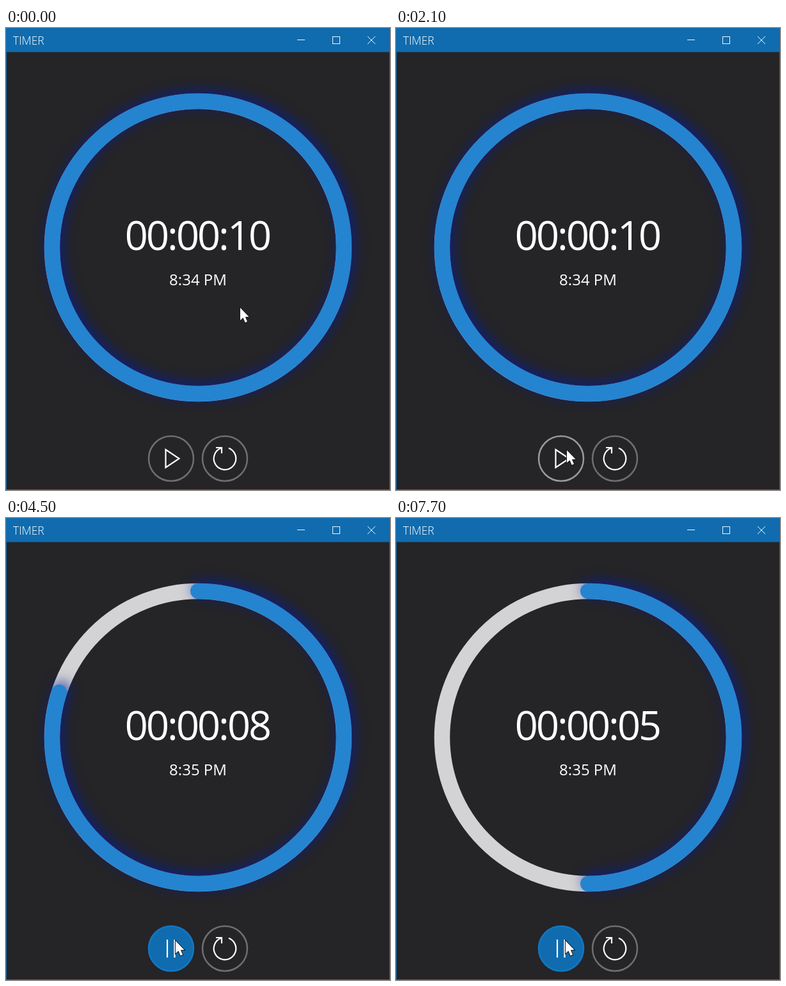
Write an HTML page with a canvas that moves like this. It is 600 px wide and 720 px high and loops after 8000 ms.

```html
<!DOCTYPE html>
<html lang="en">
<head>
<meta charset="utf-8">
<title>Timer</title>
<style>
  html, body { margin: 0; width: 100%; height: 100%; overflow: hidden; background: #252427; }
  canvas { display: block; }
</style>
</head>
<body>
<canvas id="stage" width="600" height="720"></canvas>
<script>
const ctx = document.getElementById('stage').getContext('2d');
const LOOP = 8000;
const START = 2200;
const TICKS = [3200, 4200, 5200, 6200, 7100];
const BLUE = '#106cae';
const FONT = '"Open Sans", "Noto Sans", sans-serif';
const RING = { x: 300, y: 342, r: 228, width: 24.5 };
const PLAY = { x: 258, y: 671 };
const RESET = { x: 342, y: 671 };

// Pointer stops: time, x, y
const POINTER = [[0, 366, 436], [700, 259, 650], [1000, 259, 650],
                 [1800, 267, 658], [2200, 267, 658], [2400, 265, 659]];

function pointerAt(t) {
  const next = POINTER.findIndex(stop => stop[0] > t);
  if (next < 0) return POINTER[POINTER.length - 1].slice(1);
  const [t0, x0, y0] = POINTER[next - 1];
  const [t1, x1, y1] = POINTER[next];
  const p = (t - t0) / (t1 - t0);
  const e = p * p * (3 - 2 * p);
  return [x0 + (x1 - x0) * e, y0 + (y1 - y0) * e];
}

function stroke(color, width) {
  ctx.strokeStyle = color;
  ctx.lineWidth = width;
  ctx.stroke();
}

function path(points, close) {
  ctx.beginPath();
  points.forEach(([x, y]) => ctx.lineTo(x, y));
  if (close) ctx.closePath();
}

function circle(x, y, r) {
  ctx.beginPath();
  ctx.arc(x, y, r, 0, Math.PI * 2);
}

function text(str, x, y, font, align, spacing = 0) {
  ctx.font = `${font} ${FONT}`;
  ctx.textAlign = align;
  ctx.letterSpacing = spacing + 'px';
  ctx.fillStyle = '#fff';
  ctx.fillText(str, x, y);
}

function drawWindow() {
  ctx.fillStyle = '#252427';
  ctx.fillRect(0, 0, 600, 720);
  ctx.strokeStyle = BLUE;
  ctx.lineWidth = 1;
  ctx.strokeRect(0.5, 0.5, 599, 719);
  ctx.fillStyle = BLUE;
  ctx.fillRect(0, 0, 600, 37.5);
  text('TIMER', 11, 26, '300 17.5px', 'left');

  const white = '#eef4f9';
  path([[455, 18.5], [467, 18.5]]);
  stroke(white, 1);
  ctx.strokeRect(510.5, 13.5, 11, 11);
  path([[565, 13], [577, 25]]);
  stroke(white, 1);
  path([[577, 13], [565, 25]]);
  stroke(white, 1);
}

function drawRing(fraction) {
  const { x, y, r, width } = RING;
  circle(x, y, r);
  stroke('#d3d2d4', width);

  ctx.save();
  ctx.shadowColor = 'rgba(8, 32, 140, 0.85)';
  ctx.shadowBlur = 20;
  ctx.shadowOffsetX = 4;
  ctx.shadowOffsetY = -4;
  ctx.lineCap = 'round';
  ctx.beginPath();
  ctx.arc(x, y, r, -Math.PI / 2, (fraction * 2 - 0.5) * Math.PI);
  stroke('#2484d0', width - 0.5);
  ctx.restore();
}

function drawPlayButton(running, hover) {
  const { x, y } = PLAY;
  circle(x, y, 35);
  if (running) {
    ctx.fillStyle = BLUE;
    ctx.fill();
  }
  stroke(running ? '#1177c4' : hover ? '#9a999b' : '#706e71', 2.5);

  if (running) {
    for (const dx of [-6, 5.5]) {
      path([[x + dx, y - 14], [x + dx, y + 14]]);
      stroke('#fff', 2.2);
    }
  } else {
    path([[x - 8.5, y - 14], [x - 8.5, y + 14], [x + 12.5, y]], true);
    stroke('#fff', 2.2);
  }
}

function drawResetButton() {
  const { x, y } = RESET;
  circle(x, y, 35);
  stroke('#706e71', 2.5);
  ctx.beginPath();
  ctx.arc(x, y, 17.3, -1.22, -1.88 + Math.PI * 2);
  stroke('#fff', 2.2);
  path([[x - 14, y - 17], [x - 5, y - 17], [x - 5, y - 8]]);
  stroke('#fff', 2.2);
}

function drawPointer(x, y) {
  ctx.save();
  ctx.translate(x, y);
  path([[0, 0], [0, 19.5], [4.5, 15.5], [7.7, 23], [11, 21.6], [7.8, 14.3], [13.5, 14]], true);
  stroke('#1a1a1c', 2);
  ctx.fillStyle = '#fff';
  ctx.fill();
  ctx.restore();
}

function draw(t) {
  const running = t >= START;
  const left = 10 - TICKS.filter(tick => t >= tick).length;
  const [px, py] = pointerAt(t);
  const hover = Math.hypot(px - PLAY.x, py - PLAY.y) < 36;

  drawWindow();
  drawRing(left / 10);
  text('00:00:' + String(left).padStart(2, '0'), 299, 346, '400 63px', 'center', -2.9);
  text(running ? '8:35 PM' : '8:34 PM', 300, 401, '400 24px', 'center');
  drawPlayButton(running, hover);
  drawResetButton();
  drawPointer(px, py);
}

function frame() {
  draw(performance.now() % LOOP);
  requestAnimationFrame(frame);
}
frame();
</script>
</body>
</html>
```
